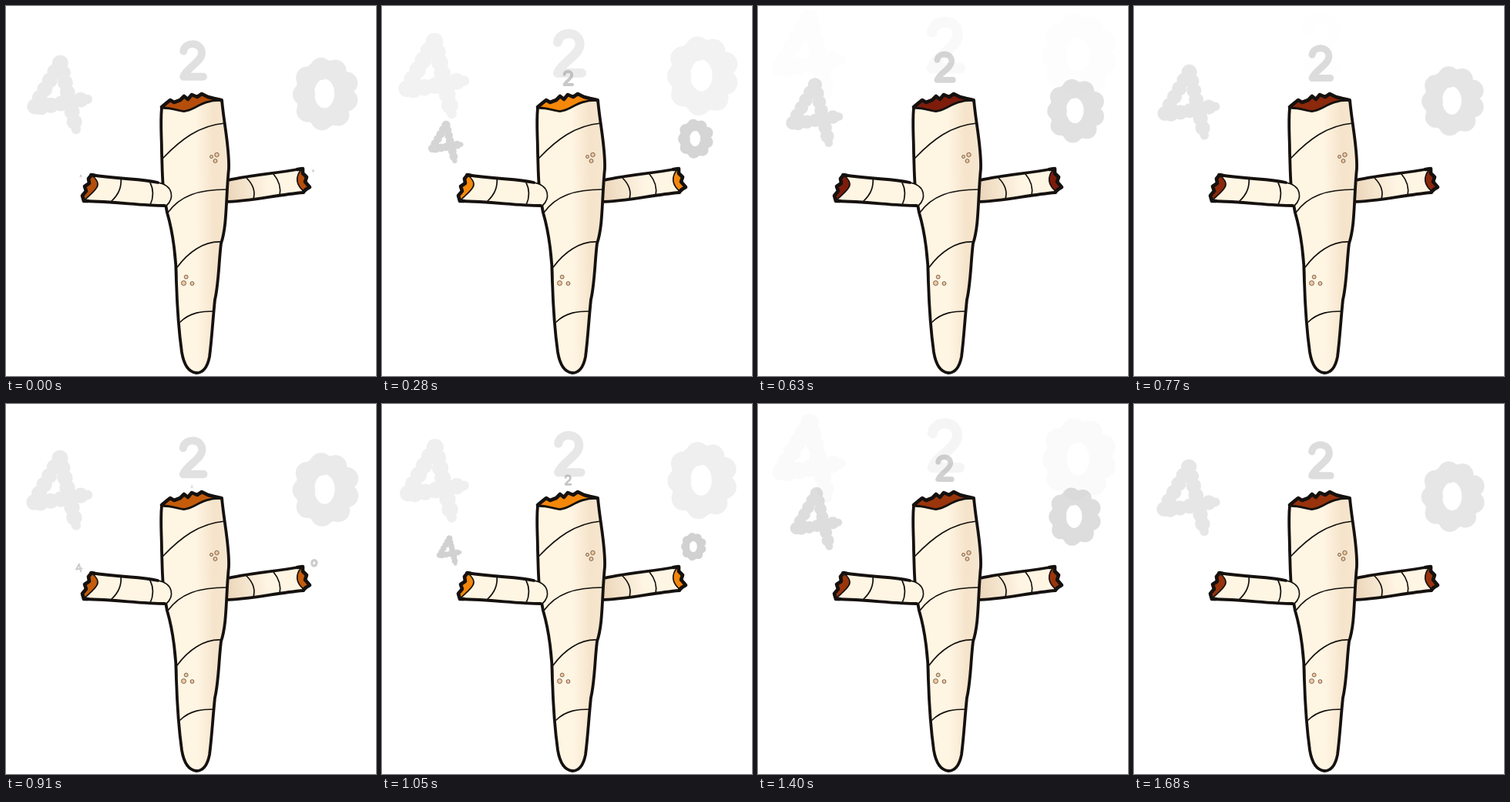
Recreate the animation shown at these times as an HTML page. Size 480 by 480 pixels, loop 1.75 s.

```html
<!DOCTYPE html>
<html lang="en">
<head>
<meta charset="utf-8">
<style>
  html, body { margin: 0; width: 100%; height: 100%; overflow: hidden; background: #fff; }
  svg { display: block; width: 100vw; height: 100vh; }
  path { stroke: #15110f; stroke-linecap: round; stroke-linejoin: round; }
  .paper { stroke-width: 3.8; }
  .edge { fill: none; stroke-width: 4.6; }
  .line { fill: none; stroke-width: 1.7; }
  .ember { fill: var(--ember); stroke-width: 1.6; }
  .spots { fill: #f0c9a2; stroke: #6e5443; stroke-width: .9; }
  #glyphs *, #smoke { fill: none; stroke: #999; }
</style>
</head>
<body>
<svg id="stage" viewBox="0 0 480 480">
  <defs>
    <linearGradient id="body" gradientUnits="userSpaceOnUse" x1="205" y1="250" x2="288" y2="249">
      <stop offset=".5" stop-color="#fff5e3"/>
      <stop offset=".8" stop-color="#f5e3ca"/>
      <stop offset="1" stop-color="#f7e7d0"/>
    </linearGradient>
    <linearGradient id="arm" gradientUnits="userSpaceOnUse" x1="287" y1="240" x2="340" y2="233">
      <stop offset="0" stop-color="#ecd6ba"/>
      <stop offset="1" stop-color="#fff5e3"/>
    </linearGradient>
    <g id="glyphs">
      <g id="four">
        <path stroke-width="12" d="M0-40L-33 17L36 5M1-42L21 44"/>
        <path stroke-width="20" stroke-dasharray="0 13" d="M0-42L-34 17L36 4M1-42L21 44"/>
      </g>
      <path id="two" stroke-width="9.5" d="M-12-12C-10-25 12-24 11-9C10 2-8 9-12 20H13"/>
      <g id="zero">
        <ellipse rx="25" ry="31" stroke-width="24"/>
        <path stroke-width="29" stroke-dasharray="0 22.1" d="M14-29C38-22 33 22 12 31C-8 38-26 28-26 6C-30-24-12-39 14-29"/>
      </g>
    </g>
  </defs>

  <g id="smoke"></g>

  <path class="paper" fill="url(#arm)" d="M284 227C310 220 345 218 384 211L386 242C350 245 315 254 284 254Z"/>
  <path class="ember" d="M383 212L385 217L390 222L388 228L394 235L389 238L387 241C376 232 375 222 383 212Z"/>
  <path class="edge" d="M378 212L385 211L385 217L390 222L388 228L394 235L389 238L386 241"/>
  <path class="line" d="M312 223Q325 236 321 250M347 218Q358 231 355 246"/>

  <path class="paper" fill="url(#body)" d="M202 132C212 131 222 135 231 136C246 135 252 121 280 122C283 155 290 184 289 211C285 250 287 285 279 308C276 332 276 360 271 381C268 410 267 432 264 455C261 470 255 476 247 476C237 475 231 467 228 449C224 420 222 390 221 358C221 330 217 295 209 268C202 235 203 215 202 190C202 170 200 152 202 132Z"/>
  <path class="ember" d="M202 131L208 126L213 122L218 125L226 122L231 117L236 121L241 115L248 118L254 114L262 118L270 120L279 122C252 121 246 135 231 136C222 135 212 131 202 131Z"/>
  <path class="edge" d="M202 131L208 126L213 122L218 125L226 122L231 117L236 121L241 115L248 118L254 114L262 118L270 120L279 122"/>
  <path class="line" d="M204 197C226 174 250 155 284 152M210 268C226 246 250 238 286 238M222 339C236 320 256 305 279 306M226 410C239 397 255 396 270 396"/>
  <g class="spots">
    <circle cx="273.5" cy="193" r="2.7"/><circle cx="266.5" cy="195.5" r="2"/><circle cx="271.5" cy="201" r="2.4"/>
    <circle cx="233.7" cy="351.5" r="2.4"/><circle cx="230.5" cy="359.5" r="3"/><circle cx="241.5" cy="360" r="2.4"/>
  </g>

  <path fill="#fff5e3" stroke="none" style="stroke:none" d="M110 219C150 226 180 224 202 231C216 235 218 250 209 259C175 259 145 257 102 253Z"/>
  <path class="edge" style="stroke-width:3.8" d="M206 259C175 259 145 254 102 253M110 219C150 225 175 224 197 229"/>
  <path class="line" d="M197 229C218 233 218 250 208 259M149 223Q151 240 137 253M187 229Q194 243 187 258"/>
  <path class="ember" d="M111 219L107 224L108 230L102 234L104 240L99 246L101 253C106 247 114 242 118 235C121 230 118 225 111 219Z"/>
  <path class="edge" d="M115 220L111 219L107 224L108 230L102 234L104 240L99 246L101 253L106 253"/>
</svg>
<script>
const STEP = 70, LOOP = 25, CYCLE = LOOP / 2;

// Start point, sideways drift, climb speed, growth, opacity and lifetime in steps
const PUFFS = [
  { glyph: "four", x: 98, y: 226, drift: -28, climb: 17.2, size: 1.2, settle: 7, ink: .5, life: 22 },
  { glyph: "zero", x: 398, y: 219, drift: 15, climb: 16.5, size: 1.2, settle: 7, ink: .5, life: 22 },
  { glyph: "two", x: 241, y: 112, drift: 1.5, climb: 6.4, size: 2.2, settle: 20, ink: .65, life: 24 },
];
const DARK = [124, 26, 12], BRIGHT = [249, 139, 10];

const stage = document.getElementById("stage");
const smoke = document.getElementById("smoke");

// Every glyph is puffed out twice per loop
const puffs = PUFFS.flatMap(puff => [0, CYCLE].map(born => {
  const node = document.createElementNS(stage.namespaceURI, "use");
  node.setAttribute("href", "#" + puff.glyph);
  smoke.append(node);
  return { ...puff, born, node };
}));

function drawPuff(puff, step) {
  const age = (step - puff.born + LOOP) % LOOP + .2;
  const scale = puff.size * (1 - Math.exp(-age / puff.settle));
  const x = puff.x + puff.drift * scale;
  const y = puff.y - puff.climb * age ** .73;
  puff.node.setAttribute("transform", `translate(${x} ${y}) scale(${scale})`);
  puff.node.setAttribute("opacity", puff.ink * Math.max(0, 1 - age / puff.life));
}

function draw(step) {
  const glow = .5 + .5 * Math.cos(2 * Math.PI * (step - 3.3) / CYCLE);
  const ember = DARK.map((v, i) => Math.round(v + (BRIGHT[i] - v) * glow));
  stage.style.setProperty("--ember", `rgb(${ember})`);
  for (const puff of puffs) drawPuff(puff, step);
}

function tick() {
  draw(Math.floor(performance.now() / STEP) % LOOP);
  requestAnimationFrame(tick);
}
tick();
</script>
</body>
</html>
```
